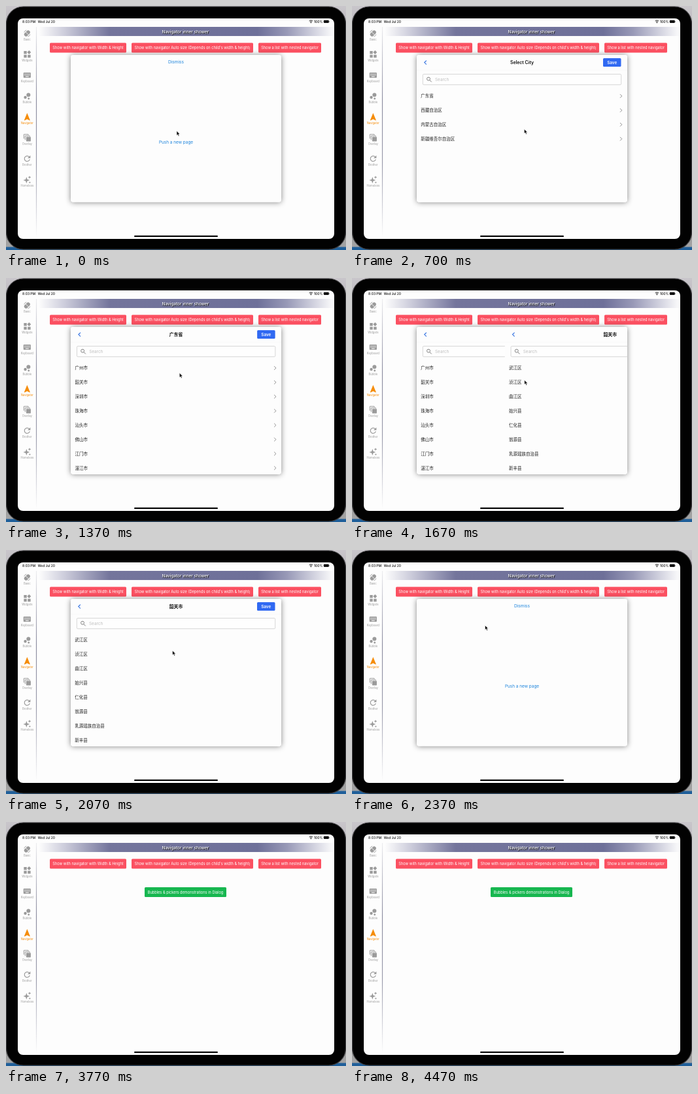
An HTML page that plays this animation: 520 px wide and 374 px high, repeating every 4.51 s.

```html
<!DOCTYPE html>
<html lang="en">
<head>
<meta charset="utf-8">
<title>Nested navigator dialog</title>
<style>
html, body { margin: 0; width: 100%; height: 100%; overflow: hidden; background: #000; }
svg { display: block; width: 520px; height: 374px; }
text { font-family: Inter, "Noto Sans CJK SC", "Noto Sans CJK", sans-serif; white-space: pre; }
.cjk { font-family: "Noto Sans CJK SC", "Noto Sans CJK", "Noto Sans CJK JP", sans-serif; }
</style>
</head>
<body>
<svg id="stage" viewBox="0 0 520 374" xmlns="http://www.w3.org/2000/svg"></svg>
<script>
const LOOP = 4510;
const DIALOG = { x: 99, y: 75, w: 322, h: 225.5 };
const GREY = '#9b9b9b', ORANGE = '#f58d0c', BLUE = '#1c84dc', RED = '#fb5061';

const label = (s, x, y, size, fill, extra = '') =>
  `<text x="${x}" y="${y}" font-size="${size}" fill="${fill}" ${extra}>${s}</text>`;
const centred = (s, x, y, size, fill, extra = '') =>
  label(s, x, y, size, fill, `text-anchor="middle" ${extra}`);
const box = (x, y, w, h, r, fill, extra = '') =>
  `<rect x="${x}" y="${y}" width="${w}" height="${h}" rx="${r}" fill="${fill}" ${extra}/>`;
const button = (s, x, y, w, fill, size) =>
  box(x, y, w, 15, 1.5, fill) + centred(s, x + w / 2, y + 9.6, size, '#fff');
const line = (d, stroke, width, extra = '') =>
  `<path d="${d}" fill="none" stroke="${stroke}" stroke-width="${width}" ${extra}/>`;
const stops = list => list.map(([at, c, o = 1]) =>
  `<stop offset="${at}" stop-color="${c}" stop-opacity="${o}"/>`).join('');

// Icons are drawn around (0,0).
const icons = [
  ['Basic', `<g transform="rotate(-45)"><rect x="-5.2" y="-2.9" width="10.4" height="5.8" rx="2.9" fill="${GREY}"/>` +
    line('M0 -3V3', '#fdfdfd', .8) + '</g>' +
    line('M-4.6 -1.5A5 5 0 0 1 -1 -5M4.6 1.5A5 5 0 0 1 1 5', GREY, .8)],
  ['Widgets', box(-5, -5, 4.4, 4.4, 0, GREY) + box(-5, .8, 4.4, 4.4, 0, GREY) + box(.9, .8, 4.4, 4.4, 0, GREY) +
    `<g transform="translate(3 -3) rotate(45)">${box(-2.1, -2.1, 4.2, 4.2, 0, GREY)}</g>`],
  ['Keyboard', box(-5.6, -4, 11.2, 8, 1, GREY) +
    line('M-4.2 -1.9H4.4M-4.2 0H4.4', '#fdfdfd', 1, 'stroke-dasharray="1 .85"') + line('M-2.4 2.2H2.4', '#fdfdfd', 1)],
  ['Bubble', `<g fill="${GREY}"><circle cx="2" cy="-1.8" r="3"/><circle cx="-2.8" cy="2" r="2.2"/><circle cx="2.4" cy="4" r="1.4"/></g>`],
  ['Navigator', `<path d="M0 -6L4.5 5L4 5.5L0 3.6L-4 5.5L-4.5 5Z" fill="${ORANGE}"/>`],
  ['Overlay', line('M-5 1.3V-5.2H1.8V-4M-3 3.3V-3H4V-2', GREY, 1) + box(-1.4, -1.4, 7, 7, .8, GREY)],
  ['Brother', line('M3.2 -2.6A4.1 4.1 0 1 0 4 1.2', GREY, 1.2) + `<path d="M5 -5V-.7H.7Z" fill="${GREY}"/>`],
  ['Homeless', `<g fill="${GREY}"><path d="M-1 -4L.3 -.3L4 1L.3 2.3L-1 6L-2.3 2.3L-6 1L-2.3 -.3Z"/>` +
    '<path d="M3.7 -5.8L4.4 -4.2L6 -3.5L4.4 -2.8L3.7 -1.2L3 -2.8L1.4 -3.5L3 -4.2Z"/>' +
    '<path d="M4 2.8L4.5 4L5.7 4.5L4.5 5L4 6.2L3.5 5L2.3 4.5L3.5 4Z"/></g>']
];

const sidebar = icons.map(([name, art], i) => {
  const y = 42 + i * 32;
  return `<g transform="translate(32.3 ${y})">${art}</g>` +
    centred(name, 32.3, y + 11, 4.2, name === 'Navigator' ? ORANGE : GREY);
}).join('');

const statusBar =
  label('8:03 PM', 25, 25.8, 5, '#111', 'font-weight="500"') +
  label('Wed Jul 20', 48.7, 25.8, 4.9, '#111', 'font-weight="500"') +
  line('M463.8 23A3.6 3.6 0 0 1 469 23M464.9 24.3A2.2 2.2 0 0 1 467.9 24.3', '#111', .9) +
  '<circle cx="466.4" cy="25.5" r=".8" fill="#111"/>' +
  label('100%', 471, 25.8, 5, '#111', 'font-weight="500"') +
  box(485.8, 21.8, 8, 4.1, 1.2, '#111') + box(494.2, 23.2, .7, 1.5, .3, '#555');

const home =
  box(50, 32, 452, 14, 0, 'url(#bar)') +
  centred('Navigator inner shower', 275.1, 42.6, 6.45, '#000', 'font-weight="500"') +
  centred('Navigator inner shower', 274.4, 41.7, 6.45, '#fff', 'font-weight="500"') +
  box(45.5, 32, 2, 322, 0, 'url(#edge)', 'opacity=".2"') +
  box(46, 32, 1, 322, 0, 'url(#edge)') +
  button('Show with navigator with Width &amp; Height', 67, 56.6, 117, RED, 5.65) +
  button('Show with navigator Auto size (Depends on child\'s width &amp; height)', 192, 56.6, 186, RED, 5.65) +
  button('Show a list with nested navigator', 386, 56.6, 96, RED, 5.65) +
  button('Bubbles &amp; pickers demonstrations in Dialog', 212, 100, 125, '#17b750', 5.65);

function page(id, title, rows, leaf) {
  const list = rows.map((name, i) => {
    const y = 138 + i * 21.9;
    return label(name, 105.3, y + 2.4, 6.5, '#1c1c1c', 'class="cjk"') +
      (leaf ? '' : line(`M410 ${y - 2.8}L412.8 ${y}L410 ${y + 2.8}`, '#777', .8));
  }).join('');
  return `<g id="${id}">` + box(99, 75, 322, 226, 0, '#fdfdfd') +
    line('M113.8 83.6L110.8 86.6L113.8 89.6', '#2b6ce0', 1.1) +
    centred(title, 260, 88.9, 6.9, '#111', 'font-weight="600"') +
    box(384, 80, 27.5, 13, 1.5, '#3069f2') + centred('Save', 397.7, 88.7, 6.3, '#fff', 'font-weight="600"') +
    line('M99 98.3H421', '#f3f3f3', .6) +
    box(108.3, 104.5, 303.4, 16.2, 1.6, '#fefefe', 'stroke="#c8c8c8" stroke-width=".7"') +
    '<circle cx="117" cy="111.7" r="2.5" fill="none" stroke="#777" stroke-width=".9"/>' +
    line('M118.9 113.6L121.7 116.4', '#777', 1) +
    label('Search', 127, 115, 6.4, '#bdbdbd') + list + '</g>';
}

const dialogRect = (fill, extra) => box(DIALOG.x, DIALOG.y, DIALOG.w, DIALOG.h, 4, fill, extra);
const dialog = '<g id="dialog">' + dialogRect('#fdfdfd', 'filter="url(#shade)"') +
  '<g clip-path="url(#panel)">' +
  centred('Dismiss', 260, 88.4, 6.6, BLUE) +
  centred('Push a new page', 260, 210.8, 6.45, BLUE) +
  page('regions', 'Select City', ['广东省', '西藏自治区', '内蒙古自治区', '新疆维吾尔自治区']) +
  page('cities', '广东省', ['广州市', '韶关市', '深圳市', '珠海市', '汕头市', '佛山市', '江门市', '湛江市']) +
  page('districts', '韶关市', ['武江区', '浈江区', '曲江区', '始兴县', '仁化县', '翁源县', '乳源瑶族自治县', '新丰县'], true) +
  '</g></g>';

const stage = document.getElementById('stage');
stage.innerHTML = `<defs>
  <linearGradient id="back" x2="0" y2="1">${stops([[0, '#c9c6cb'], [.5, '#777'], [.985, '#a3a3a3'], [.99, '#1f5f9a'], [1, '#1f5f9a']])}</linearGradient>
  <linearGradient id="bar">${stops([[0, '#fdfdfd'], [.09, '#cbcbda'], [.24, '#74759c'], [.74, '#6e7099'], [.84, '#9899b7'], [1, '#fdfdfd']])}</linearGradient>
  <linearGradient id="edge" x2="0" y2="1">${stops([[0, '#77788f', .1], [.35, '#77788f', .8], [.65, '#77788f', .7], [1, '#77788f', 0]])}</linearGradient>
  <filter id="shade" x="-10%" y="-10%" width="120%" height="125%"><feDropShadow dx="0" dy="0.5" stdDeviation="4.5" flood-color="#000" flood-opacity=".48"/></filter>
  <clipPath id="panel">${dialogRect('#000')}</clipPath>
  <clipPath id="screen">${box(18, 19, 484, 338, 8, '#000')}</clipPath>
</defs>` +
  box(0, 0, 520, 374, 0, 'url(#back)') +
  box(.5, 1, 519, 372, 26, '#020202', 'stroke="#3d3d3f" stroke-width="1.2"') +
  '<g clip-path="url(#screen)">' + box(18, 19, 484, 338, 0, '#fdfdfd') +
  statusBar + sidebar + home + dialog + box(196, 351.8, 128, 2.3, 1.1, '#080808') + '</g>' +
  '<path id="cursor" d="M0 0V6.9L1.6 5.4L2.7 8L4 7.4L2.9 5H5Z" fill="#000" stroke="#fff" stroke-width=".6"/>';

const el = id => document.getElementById(id);
const parts = Object.fromEntries(['dialog', 'regions', 'cities', 'districts', 'cursor'].map(id => [id, el(id)]));

const clamp = v => Math.min(1, Math.max(0, v));
const easeOut = p => 1 - (1 - p) ** 3;
const span = (t, start, length) => clamp((t - start) / length);
const POP = 2113;

// time, x, y of the pointer tip
const route = [
  [0, 261, 191.5], [200, 261, 206], [500, 261.5, 206], [970, 266.3, 161.8], [1100, 266.5, 137],
  [1260, 266.5, 137], [1500, 263.7, 156.4], [1900, 263.7, 156.4], [2100, 254, 154], [2370, 203.5, 115.5],
  [2650, 198, 104], [3120, 260.2, 87], [3400, 260.2, 87], [3700, 526, -12], [LOOP, 526, -12]
];

function pointer(t) {
  const i = Math.max(1, route.findIndex(k => k[0] > t));
  const [a, ax, ay] = route[i - 1], [b, bx, by] = route[i];
  const p = (t - a) / (b - a), s = p * p * (3 - 2 * p);
  return [ax + (bx - ax) * s, ay + (by - ay) * s];
}

function place(node, x, y) {
  node.setAttribute('transform', `translate(${x.toFixed(2)} ${y.toFixed(2)})`);
}

function slide(node, t, start, top) {
  let x = DIALOG.w * (1 - easeOut(span(t, start, 250)));
  if (t >= POP) x = top ? DIALOG.w * easeOut(span(t, POP, 250)) : DIALOG.w;
  node.style.display = x > DIALOG.w - .2 ? 'none' : '';
  place(node, x, 0);
}

function draw(t) {
  slide(parts.regions, t, 270);
  slide(parts.cities, t, 1140);
  slide(parts.districts, t, 1608, true);
  const leave = span(t, 3370, 250);
  parts.dialog.style.display = leave === 1 ? 'none' : '';
  place(parts.dialog, 0, 300 * leave);
  place(parts.cursor, ...pointer(t));
}

const began = performance.now();
function tick() {
  draw((performance.now() - began) % LOOP);
  requestAnimationFrame(tick);
}
tick();
</script>
</body>
</html>
```
